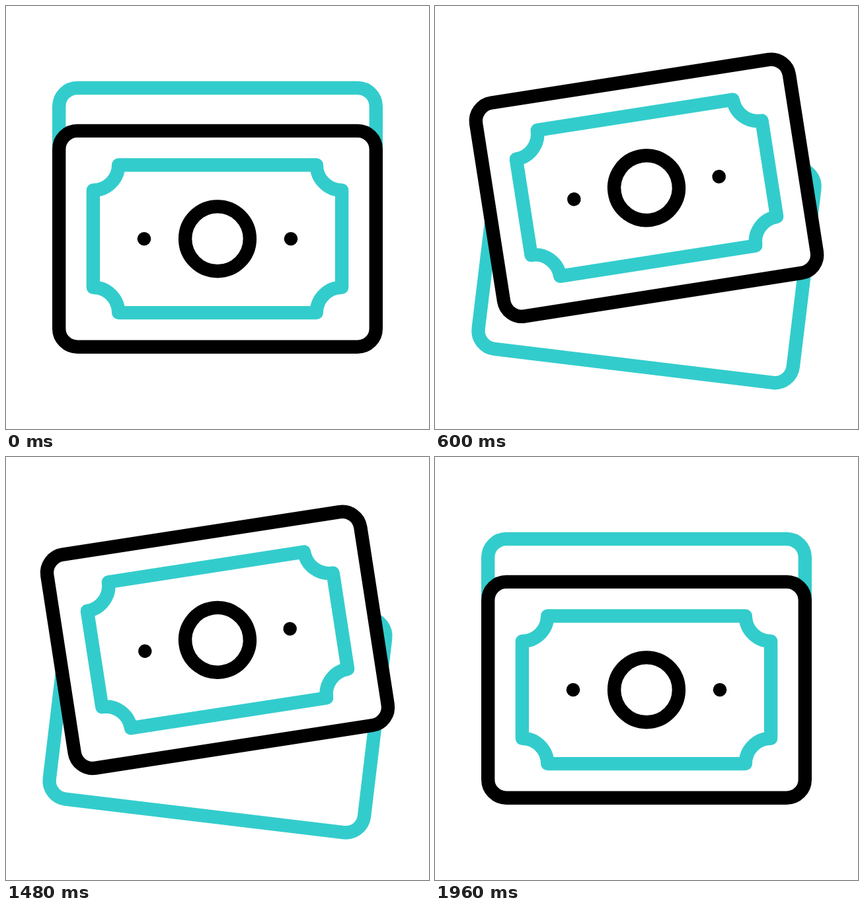
An HTML page with a canvas that plays this animation: 640x640 px, repeating every 2000 ms.

```html
<!DOCTYPE html>
<html lang="en">
<head>
<meta charset="utf-8">
<title>Banknotes</title>
<style>
html, body { margin: 0; width: 100%; height: 100%; overflow: hidden; background: #fff; }
canvas { display: block; width: 640px; height: 640px; }
</style>
</head>
<body>
<canvas id="stage" width="640" height="640"></canvas>
<script>
const ctx = document.getElementById('stage').getContext('2d');
const LOOP = 2000, TEAL = '#33cccc', BLACK = '#000', LINE = 20.4;
const TAU = Math.PI * 2;

// Key times: rest, swing, fanned out, fanned out, swing, rest
const TIMES = [80, 280, 640, 1440, 1760, 1960];

// Each track: value per key, then the [start, end] slopes of each segment
const FRONT_Y = {
  v: [352.3, 415, 271.3, 271.3, 416, 352.3],
  k: [[0, .57], [.5, 0], [0, 0], [0, .46], [.5, 0]]
};
const BACK_Y = {
  v: [287.4, 245, 386, 386, 244.5, 287.4],
  k: [[0, .85], [.58, 0], [0, 0], [0, .5], [.5, 0]]
};
const TILT = {
  v: [0, 2.6, 9, 9, 2.35, 0],
  k: [[0, 1.6], [1.37, 0], [0, 0], [0, .72], [1.37, 0]]
};

const clamp = t => Math.min(1, Math.max(0, t));

// Hermite ease from 0 to 1 with given end slopes
function ease(t, a = 0, b = 0) {
  const t2 = t * t, t3 = t2 * t;
  return 3 * t2 - 2 * t3 + a * (t3 - 2 * t2 + t) + b * (t3 - t2);
}

function track({ v, k }, ms) {
  if (ms <= TIMES[0]) return v[0];
  for (let i = 0; i < k.length; i++) {
    const from = TIMES[i], to = TIMES[i + 1];
    if (ms < to) {
      return v[i] + (v[i + 1] - v[i]) * ease((ms - from) / (to - from), ...k[i]);
    }
  }
  return v[v.length - 1];
}

const span = (ms, from, to) => ease(clamp((ms - from) / (to - from)));

function place(y, degrees, draw) {
  ctx.save();
  ctx.translate(320, y);
  ctx.rotate(degrees * Math.PI / 180);
  draw();
  ctx.restore();
}

function stroke(color, width = LINE) {
  ctx.strokeStyle = color;
  ctx.lineWidth = width;
  ctx.stroke();
}

function card(color) {
  const w = 239.8, h = 163.4, r = 27.8;
  ctx.beginPath();
  ctx.moveTo(0, -h);
  ctx.arcTo(w, -h, w, h, r);
  ctx.arcTo(w, h, -w, h, r);
  ctx.arcTo(-w, h, -w, -h, r);
  ctx.arcTo(-w, -h, w, -h, r);
  ctx.closePath();
  ctx.fillStyle = '#fff';
  ctx.fill();
  stroke(color);
}

function notchedFrame() {
  const w = 188.1, h = 111.8, r = 38.3, q = Math.PI / 2;
  ctx.beginPath();
  ctx.arc(-w, -h, r, q, 0, true);
  ctx.arc(w, -h, r, 2 * q, q, true);
  ctx.arc(w, h, r, 3 * q, 2 * q, true);
  ctx.arc(-w, h, r, 0, 3 * q, true);
  ctx.closePath();
  stroke(TEAL);
}

function dot(x) {
  ctx.beginPath();
  ctx.arc(x, 0, 10.3, 0, TAU);
  ctx.fillStyle = BLACK;
  ctx.fill();
}

function ring(ms) {
  ctx.beginPath();
  ctx.arc(0, 0, 48.9, 0, TAU);
  stroke(BLACK);
  const head = span(ms, 640, 1130), tail = span(ms, 810, 1440);
  if (head > tail) {
    ctx.beginPath();
    ctx.arc(0, 0, 49.2, (tail - .25) * TAU, (head - .25) * TAU);
    stroke(TEAL, 21.6);
  }
}

function paint(ms) {
  ctx.fillStyle = '#fff';
  ctx.fillRect(0, 0, 640, 640);
  const tilt = track(TILT, ms);
  place(track(BACK_Y, ms), tilt * 7 / 9, () => card(TEAL));
  place(track(FRONT_Y, ms), -tilt, () => {
    card(BLACK);
    notchedFrame();
    dot(-111);
    dot(111);
    ring(ms);
  });
}

ctx.lineCap = ctx.lineJoin = 'round';
const start = performance.now();

function tick() {
  paint((performance.now() - start) % LOOP);
  requestAnimationFrame(tick);
}
tick();
</script>
</body>
</html>
```
